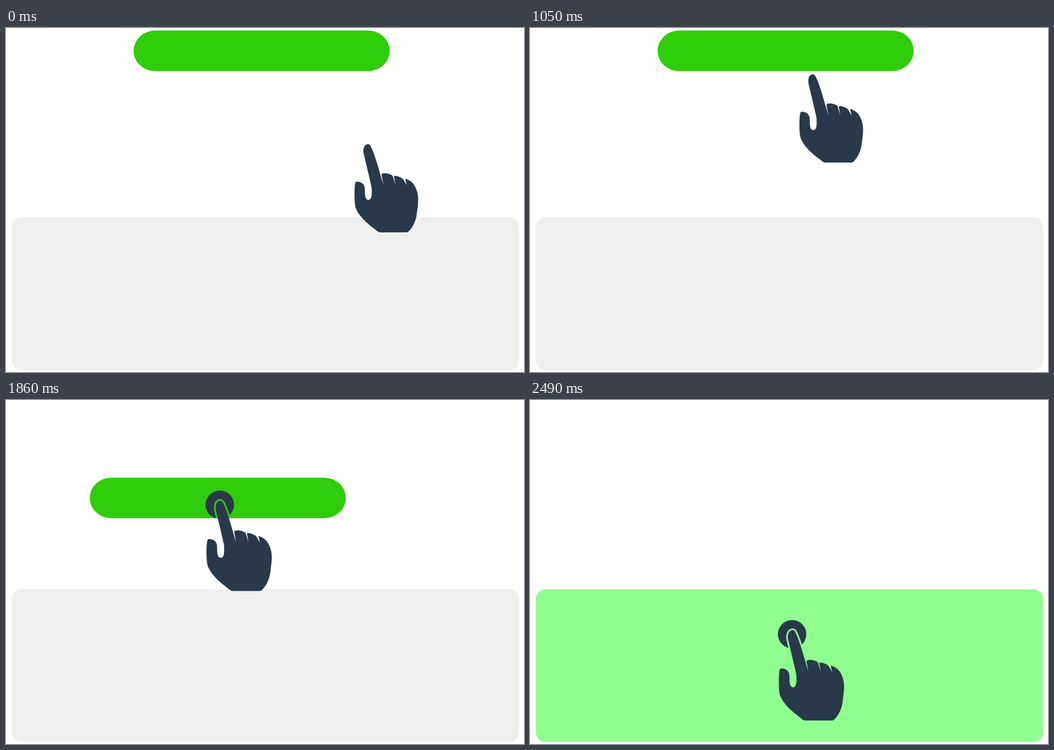
An HTML page that plays this animation: 917x611 px, repeating every 2880 ms.

```html
<!DOCTYPE html>
<html lang="en">
<head>
<meta charset="utf-8">
<title>Drag and drop</title>
<style>
  html, body { margin: 0; width: 100%; height: 100%; overflow: hidden; background: #fff; }
  svg { display: block; width: 100%; height: 100%; }
</style>
</head>
<body>
<svg viewBox="0 0 917 611">
  <defs>
    <path id="shape" d="M23 .3C26 0 27.5 2 29 5C37 21 44 49 51 73L48 56C47.6 53 49 52 52 52
      C58 51.5 67 54 68 58C69 62 71 68 72.5 73L70 59C69.6 57 70 56.5 72 56.5C77 57 85 60 87 64L92.5 73.5
      L90 64C89.7 62 90 61.8 91.5 62.3C97 64 102.5 68 105 72C110 79.5 113 89 112.7 100
      C112.5 108 111 117 110 126C108 138 103 148 96.5 154.5C95 156.5 93 157 91 157H46
      C44 157 42.5 156.5 41 155.3C29 146 9 132 1.8 113C0 105 0 97 0 87C0 80 .3 74 1.4 69.5
      C2 67 3.5 66.7 5.5 66.9C12 67.3 17 71 18 77.5C18.6 82 18 88 18.8 92C19.5 96 21.5 99.5 24.5 99.5
      C28 99.5 30 95.5 30.3 91C30.5 87 30.5 82 30.3 78C28 66 21 38 16 16C14.5 8 18 1 23 .3Z"/>
    <mask id="gap" maskUnits="userSpaceOnUse" x="-30" y="-30" width="60" height="60">
      <rect x="-30" y="-30" width="60" height="60" fill="#fff"/>
      <use href="#shape" transform="translate(-23.5 -7.7) scale(1.025)" stroke="#000" stroke-width="5.8"/>
    </mask>
  </defs>
  <rect id="zone" x="10.3" y="336" width="898.2" height="271.6" rx="18"/>
  <rect id="button" x="-226.7" y="-36" width="453.4" height="72" rx="38" ry="36" fill="#2fcc0a"/>
  <g fill="#293949">
    <use id="hand" href="#shape"/>
    <g id="press">
      <circle r="25.2" mask="url(#gap)"/>
      <use href="#shape" transform="translate(-23.5 -7.7) scale(1.025)"/>
    </g>
  </g>
</svg>
<script>
const LOOP = 2880, STEP = 30, GRAB = 1380, DROP = 2430;
const $ = id => document.getElementById(id);
const ramp = (t, a, b) => Math.min(1, Math.max(0, (t - a) / (b - a)));
const mix = (a, b, p) => a + (b - a) * p;

// Drag paths: start, two control points, end
const buttonPath = [[453, 46], [333.5, 65], [365.3, 301], [454, 396]];
const handPath = [[452, 47], [301.3, 67], [411.6, 328.3], [464, 416]];

function bezier([a, b, c, d], u) {
  const v = 1 - u;
  return [0, 1].map(i =>
    v * v * v * a[i] + 3 * u * v * v * b[i] + 3 * u * u * v * c[i] + u * u * u * d[i]);
}

function place(id, [x, y], scale = 1) {
  $(id).setAttribute('transform', `translate(${x.toFixed(2)} ${y.toFixed(2)}) scale(${scale})`);
}

function draw(t) {
  const drag = ramp(t, GRAB, DROP);
  const held = t > GRAB;

  const approach = ramp(t, 270, 1320);
  place('hand', [mix(617, 428.5, approach), mix(206, 39, approach)]);
  place('press', bezier(handPath, drag));
  $('hand').style.display = held ? 'none' : '';
  $('press').style.display = held ? '' : 'none';

  if (t < GRAB) place('button', [452.6, 40.6]);
  else place('button', bezier(buttonPath, drag), mix(0.98, 1, ramp(t, GRAB, GRAB + 90)));
  $('button').setAttribute('opacity', 1 - ramp(t, DROP, DROP + 60));

  const lit = ramp(t, 2280, 2400);
  const side = Math.round(mix(239, 144, lit));
  $('zone').setAttribute('fill', `rgb(${side},${Math.round(mix(239, 255, lit))},${side})`);
}

const start = performance.now();
function tick() {
  const t = (performance.now() - start) % LOOP;
  draw(Math.floor(t / STEP) * STEP);
  requestAnimationFrame(tick);
}
draw(0);
requestAnimationFrame(tick);
</script>
</body>
</html>
```
